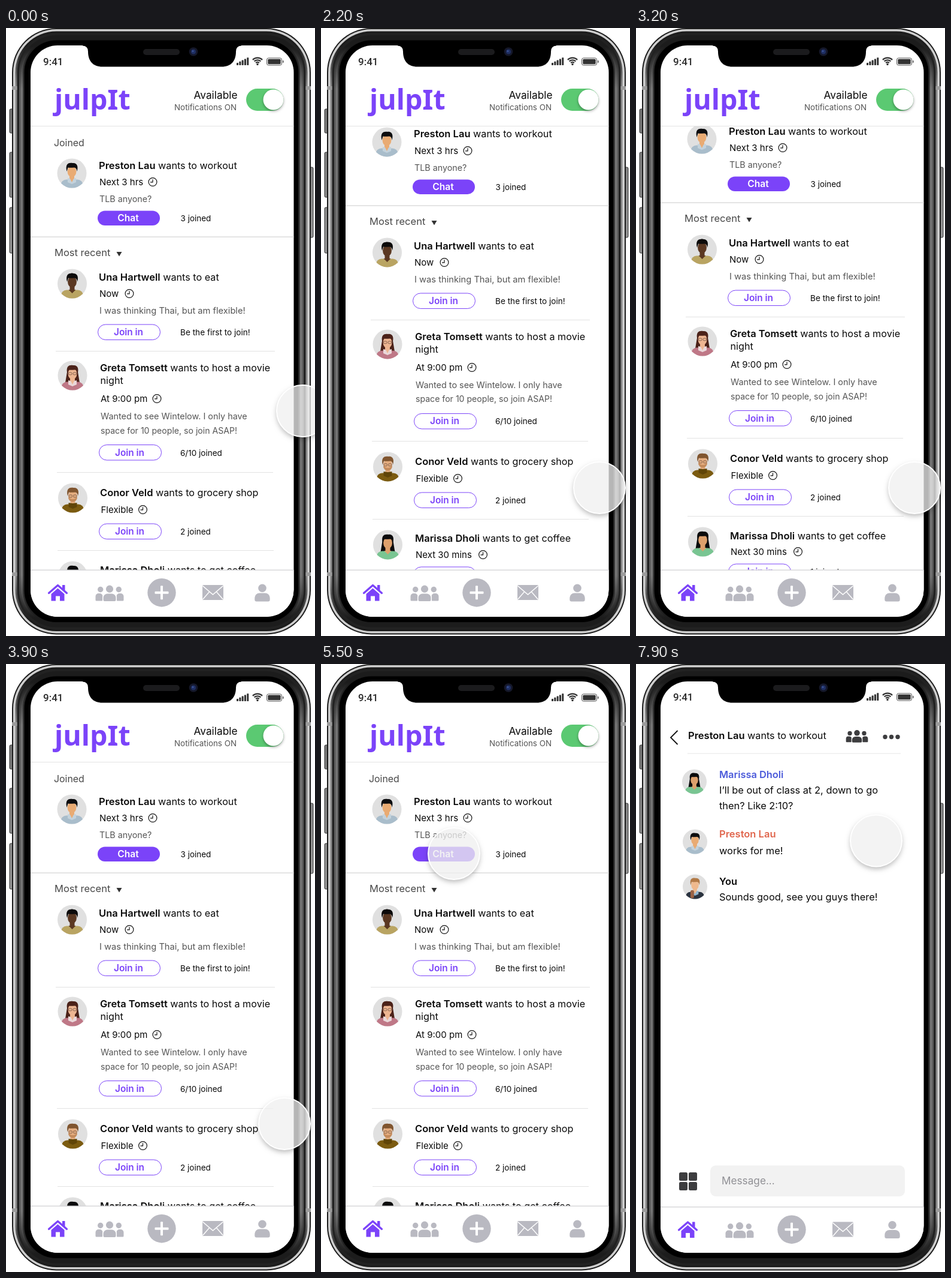
These frames come from a looping animation (516x1013 px, 8000 ms). An HTML page with a canvas:

```html
<!DOCTYPE html>
<html lang="en">
<head>
<meta charset="utf-8">
<title>Activity feed</title>
<style>
html, body { margin: 0; width: 100%; height: 100%; overflow: hidden; background: #fff; }
canvas { display: block; width: 516px; height: 1013px; }
</style>
</head>
<body>
<canvas id="stage"></canvas>
<script>
const W = 516, H = 1013, LOOP = 8000, TAU = Math.PI * 2;
const PURPLE = '#7b43f9', INK = '#0a0a0a', SOFT = '#555', GREY = '#b9b9c1', DARK = '#3d3d3f';
const canvas = document.getElementById('stage');
const ctx = canvas.getContext('2d');
const dpr = window.devicePixelRatio || 1;
canvas.width = W * dpr;
canvas.height = H * dpr;

// drawing helpers
function box(x, y, w, h, r, fill, stroke, line = 1) {
  ctx.beginPath();
  ctx.roundRect(x, y, w, h, r);
  paint(fill, stroke, line);
}
function disc(x, y, r, fill, stroke, line = 1) {
  ctx.beginPath();
  ctx.arc(x, y, r, 0, TAU);
  paint(fill, stroke, line);
}
function oval(x, y, rx, ry, fill) {
  ctx.beginPath();
  ctx.ellipse(x, y, rx, ry, 0, 0, TAU);
  paint(fill);
}
function poly(points, fill, stroke, line = 1) {
  ctx.beginPath();
  points.forEach(([x, y]) => ctx.lineTo(x, y));
  if (fill) ctx.closePath();
  paint(fill, stroke, line);
}
function paint(fill, stroke, line) {
  if (fill) { ctx.fillStyle = fill; ctx.fill(); }
  if (stroke) { ctx.strokeStyle = stroke; ctx.lineWidth = line; ctx.stroke(); }
}
function text(str, x, y, size, color = INK, weight = 400, align = 'left', family = 'Inter') {
  ctx.font = `${weight} ${size}px ${family}, sans-serif`;
  ctx.fillStyle = color;
  ctx.textAlign = align;
  ctx.fillText(str, x, y);
  return ctx.measureText(str).width;
}
function rule(x1, x2, y, color = '#e2e2e2', h = 1) {
  ctx.fillStyle = color;
  ctx.fillRect(x1, y, x2 - x1, h);
}
function at(x, y, scale, draw) {
  ctx.save();
  ctx.translate(x, y);
  ctx.scale(scale, scale);
  draw();
  ctx.restore();
}

// people
const PEOPLE = {
  preston: { name: 'Preston Lau', skin: '#e9ab73', hair: '#0d0d0f', top: '#a9bdcb', collar: '#c3d2dc' },
  una: { name: 'Una Hartwell', skin: '#5a3721', hair: '#0c0a0a', top: '#b9a462', bun: true },
  greta: { name: 'Greta Tomsett', skin: '#edb591', hair: '#4b2219', top: '#bf7887', collar: '#ead8da', long: true, glasses: true },
  conor: { name: 'Conor Veld', skin: '#e5ad7f', hair: '#80552f', top: '#7b5b10', collar: '#604508', beard: '#c48b5c', glasses: true },
  marissa: { name: 'Marissa Dholi', skin: '#dda06c', hair: '#0b0b0c', top: '#79c592', long: true },
  you: { name: 'You', skin: '#efb98d', hair: '#b27a47', top: '#2b333f', collar: '#8fb5cf', scarf: true }
};

function avatar(p, x, y, r) {
  at(x, y, r / 24.5, () => {
    disc(0, 0, 24.5, '#e0e0e0');
    ctx.beginPath();
    ctx.arc(0, 0, 24.5, 0, TAU);
    ctx.clip();
    if (p.long) poly([[-8, -12], [8, -12], [10, 0], [12, 12], [-12, 12], [-10, 0]], p.hair);
    if (p.bun) oval(0, -14, 5, 3.5, p.hair);
    box(-18.5, 10.5, 37, 20, [9, 9, 0, 0], p.top);
    box(-4, 2, 8, 10, 3, p.skin);
    poly([[-6, 10], [6, 10], [0, 16]], p.skin);
    if (p.collar) {
      const s = p.beard ? 0 : 3;
      poly([[-7, 8], [-s, 9], [0, 15], [s, 9], [7, 8], [7, 15], [0, 18], [-7, 15]], p.collar);
    }
    if (p.scarf) box(-9, 7, 7, 16, 3, '#9a6244');
    oval(0, -3, 7.4, 9.5, p.skin);
    if (p.beard) {
      ctx.beginPath();
      ctx.ellipse(0, -1, 7.4, 7.5, 0, 0, Math.PI);
      paint(p.beard);
      oval(0, -1, 5.5, 3, p.skin);
    }
    ctx.beginPath();
    ctx.moveTo(-8.5, -3);
    ctx.bezierCurveTo(-12, -17, -4, -18, 1, -17);
    ctx.bezierCurveTo(9, -18, 11, -11, 8.5, -3);
    ctx.quadraticCurveTo(8, -9, 4, -9.5);
    ctx.quadraticCurveTo(-4, -9, -6.5, -9.5);
    ctx.closePath();
    paint(p.hair);
    if (p.glasses) {
      box(-6.5, -5, 5.5, 3.8, 1.5, null, '#5a4034', 0.7);
      box(1, -5, 5.5, 3.8, 1.5, null, '#5a4034', 0.7);
    }
  });
}

// icons
function clock(x, y) {
  disc(x, y, 6.9, null, '#111', 1.2);
  poly([[x, y - 4.2], [x, y + 0.4], [x - 4, y + 0.4]], null, '#111', 1.2);
}
function group(x, y, scale, color) {
  at(x, y, scale, () => {
    for (const s of [-1, 1]) {
      disc(s * 15.3, -6.5, 4.7, color);
      box(s * 17.5 - 6, 0, 12, 12.5, [5, 5, 1.5, 1.5], color);
    }
    box(-12, -1, 24, 15, [8, 8, 3, 3], '#fff');
    disc(0, -7.3, 7.6, '#fff');
    disc(0, -7.3, 6.1, color);
    box(-10.5, 0.5, 21, 12.5, [7, 7, 2, 2], color);
  });
}
function home(x, y) {
  at(x, y, 1, () => {
    ctx.lineCap = 'round';
    ctx.lineJoin = 'round';
    box(7.5, -12, 4.5, 9, 0.5, PURPLE);
    poly([[-15, 1.5], [0, -11.5], [15, 1.5]], null, PURPLE, 3.2);
    poly([[-11, 3], [0, -6.5], [11, 3], [11, 14.5], [3.5, 14.5], [3.5, 6.5], [-3.5, 6.5], [-3.5, 14.5], [-11, 14.5]], PURPLE);
  });
}
function mail(x, y) {
  box(x - 17.5, y - 12.5, 35, 25, 1.5, GREY);
  poly([[x - 17, y - 11], [x, y + 3.5], [x + 17, y - 11]], null, '#fff', 1.6);
  poly([[x - 17, y + 11.5], [x - 6, y - 1]], null, '#fff', 1.4);
  poly([[x + 17, y + 11.5], [x + 6, y - 1]], null, '#fff', 1.4);
}
function nav(dy) {
  ctx.fillStyle = '#fff';
  ctx.fillRect(41, 903 + dy, 440, 80);
  rule(41, 481, 902.5 + dy, '#d3d3d5', 1.3);
  home(86.5, 940 + dy);
  group(173, 942 + dy, 1, GREY);
  disc(260, 940.7 + dy, 23.7, GREY);
  box(248.5, 938.7 + dy, 23, 4, 1, '#fff');
  box(258, 929.2 + dy, 4, 23, 1, '#fff');
  mail(345.5, 940.5 + dy);
  disc(428, 933.3 + dy, 6.8, GREY);
  box(415.3, 941.5 + dy, 25.4, 14, [8, 8, 3, 3], GREY);
}

// feed
function heading(p, rest, x, y) {
  const w = text(p.name, x, y, 16.5, INK, 600);
  text(' ' + rest, x + w, y, 16.2);
}
function joinPill(x, y) {
  box(x, y, 104, 25.5, 12.75, '#fff', PURPLE);
  text('Join in', x + 51, y + 18, 15.4, PURPLE, 600, 'center');
}
function entry(p, o) {
  avatar(p, o.ax, o.ay, 24.5);
  heading(p, o.title, o.x, o.y);
  text(o.when, o.wx, o.wy, 15);
  clock(o.cx, o.wy - 5.5);
}

function feed(scroll) {
  ctx.save();
  ctx.beginPath();
  ctx.rect(41, 163, 440, 740);
  ctx.clip();
  ctx.translate(0, -scroll);

  text('Joined', 80, 197, 15.9, '#484848');
  entry(PEOPLE.preston, { ax: 110, ay: 242, x: 155, y: 234.5, title: 'wants to workout', when: 'Next 3 hrs', wx: 156, wy: 262, cx: 245 });
  text('TLB anyone?', 156, 290, 14.3, SOFT);
  box(153, 304.5, 104, 24.5, 12.25, PURPLE);
  text('Chat', 204, 322, 15.6, '#fff', 600, 'center');
  text('3 joined', 291.5, 322, 13.5);
  rule(41, 481, 347.3, '#dcdcdc', 1.5);

  text('Most recent', 81, 380, 16.5, '#484848');
  poly([[184.5, 373], [193.5, 373], [189, 380.5]], '#333');

  entry(PEOPLE.una, { ax: 110.5, ay: 426, x: 155, y: 421, title: 'wants to eat', when: 'Now', wx: 156, wy: 448, cx: 206 });
  text('I was thinking Thai, but am flexible!', 156, 476, 14.7, SOFT);
  joinPill(153.5, 494);
  text('Be the first to join!', 291, 512, 13.6);
  rule(83, 449, 538);

  entry(PEOPLE.greta, { ax: 111, ay: 579, x: 157, y: 572, title: 'wants to host a movie', when: 'At 9:00 pm', wx: 158, wy: 623, cx: 252 });
  text('night', 157.5, 593, 16.2);
  text('Wanted to see Wintelow. I only have', 158, 652, 14.4, SOFT);
  text('space for 10 people, so join ASAP!', 158, 675.5, 14.1, SOFT);
  joinPill(155.5, 694.5);
  text('6/10 joined', 291, 712.5, 13.5);
  rule(85, 446, 740);

  entry(PEOPLE.conor, { ax: 111.5, ay: 783, x: 157, y: 780, title: 'wants to grocery shop', when: 'Flexible', wx: 158.5, wy: 808, cx: 228.5 });
  joinPill(155.5, 826);
  text('2 joined', 291, 844, 13.5);
  rule(86, 447, 870);

  entry(PEOPLE.marissa, { ax: 111.5, ay: 913, x: 157, y: 908.5, title: 'wants to get coffee', when: 'Next 30 mins', wx: 158, wy: 935, cx: 270.5 });
  joinPill(154.5, 950);
  text('1 joined', 291, 968, 13.5);
  ctx.restore();

  // header
  text('julpIt', 81, 135.5, 46.5, PURPLE, 700, 'left', '"Noto Sans"');
  text('Available', 386.5, 118, 17.3, INK, 400, 'right');
  text('Notifications ON', 385, 136.5, 13.4, SOFT, 400, 'right');
  box(401, 101, 62.5, 37, 18.5, '#5bc972');
  ctx.save();
  ctx.shadowColor = 'rgba(0,0,0,.35)';
  ctx.shadowBlur = 4 * dpr;
  ctx.shadowOffsetY = 2 * dpr;
  disc(446.5, 119.5, 17, '#fff');
  ctx.restore();
  rule(41, 481, 163, '#e3e3e3');
  nav(0);
}

// conversation
function chat() {
  poly([[69.5, 111], [58, 122.5], [69.5, 134]], null, '#111', 1.8);
  heading(PEOPLE.preston, 'wants to workout', 87, 125);
  group(369, 120.5, 0.78, DARK);
  for (const x of [416, 426.5, 437]) disc(x, 121.5, 3.7, DARK);
  rule(86, 442, 148.5, '#ececec', 1.3);

  avatar(PEOPLE.marissa, 97.5, 196, 20.5);
  text(PEOPLE.marissa.name, 139, 189.5, 16.4, '#4b5ada', 600);
  text('I’ll be out of class at 2, down to go', 139, 215.5, 16.4);
  text('then? Like 2:10?', 139, 242, 16.4);

  avatar(PEOPLE.preston, 98.5, 296, 20.5);
  text(PEOPLE.preston.name, 139, 289, 16.5, '#e0654c', 600);
  text('works for me!', 139, 317, 16.4);

  avatar(PEOPLE.you, 98.5, 371, 20.5);
  text(PEOPLE.you.name, 139, 367.5, 16.4, INK, 600);
  text('Sounds good, see you guys there!', 139, 393.5, 16.4);

  for (const x of [72, 88]) for (const y of [847, 863]) box(x, y, 14, 14, 2.5, DARK);
  box(124, 835.5, 325, 51.5, 9, '#f2f2f2');
  text('Message...', 143, 867, 17.2, '#909095');
  nav(1.5);
}

// device
function metal(tone) {
  const g = ctx.createLinearGradient(0, 0, 0, H);
  g.addColorStop(0, '#1c1c1c');
  g.addColorStop(0.03, '#1c1c1c');
  g.addColorStop(0.1, tone);
  g.addColorStop(0.9, tone);
  g.addColorStop(0.97, '#1c1c1c');
  g.addColorStop(1, '#1c1c1c');
  return g;
}
function body() {
  const edge = ctx.createLinearGradient(0, 130, 0, 380);
  edge.addColorStop(0, '#777');
  edge.addColorStop(1, '#999');
  for (const [y, h] of [[135, 40], [207, 75], [299, 76]]) box(6, y, 8, h, 2, edge, '#333');
  box(505, 232, 8, 117, 2, edge, '#333');

  const layers = [[0, '#1c1c1c'], [2, '#cfcfcf'], [5.5, metal('#8a8a8a')], [8.5, '#222'], [12, metal('#5f5f5f')], [15, metal('#777')], [18, metal('#3a3a3a')], [20.5, '#000']];
  for (const [d, fill] of layers) box(10 + d, d, 499 - 2 * d, 1010.5 - 2 * d, 74 - d, fill);
  for (const x of [10, 500.5]) for (const y of [97, 907]) box(x, y, 8.5, 6, 0, '#9c9c9c');
}
function notch() {
  ctx.beginPath();
  ctx.moveTo(128, 28);
  ctx.lineTo(393, 28);
  ctx.lineTo(393, 29.5);
  ctx.quadraticCurveTo(384, 30, 384, 39);
  ctx.bezierCurveTo(384, 55, 376, 64.5, 360, 64.5);
  ctx.lineTo(161, 64.5);
  ctx.bezierCurveTo(145, 64.5, 137, 55, 137, 39);
  ctx.quadraticCurveTo(137, 30, 128, 29.5);
  ctx.closePath();
  paint('#000');
  box(229, 35, 61, 10, 5, '#1b1b1d');
  disc(313, 39.5, 7.3, '#15182a');
  disc(313, 39.5, 4, '#1f2f63');
  disc(312, 38.5, 1.5, '#3d5595');
}
function status(dy) {
  at(0, dy, 1, () => {
    text('9:41', 62, 61.5, 17, '#2b2b2b', 500, 'left', 'Roboto');
    for (let i = 0; i < 5; i++) {
      const h = 4 + i * 2.2;
      box(385 + i * 4.3, 62 - h, 3.1, h, 0.8, '#333');
    }
    for (const r of [4, 7.7, 11.4]) {
      ctx.beginPath();
      ctx.arc(420, 61, r, -Math.PI * 0.75, -Math.PI * 0.25);
      paint(null, '#333', 2.3);
    }
    disc(420, 60.5, 1.7, '#333');
    box(435.5, 50, 25, 12, 3, null, '#555');
    box(437.3, 51.8, 21.4, 8.4, 1.5, '#333');
    box(462, 54, 1.6, 4, 0.8, '#555');
  });
}

function cursor(x, y) {
  const r = 43;
  ctx.save();
  ctx.beginPath();
  ctx.rect(0, 0, W, H);
  ctx.arc(x, y, r, 0, TAU);
  ctx.clip('evenodd');
  ctx.shadowColor = 'rgba(0,0,0,.28)';
  ctx.shadowBlur = 8 * dpr;
  ctx.shadowOffsetY = 4 * dpr;
  disc(x, y, r, '#fff');
  ctx.restore();
  disc(x, y, r, 'rgba(240,240,240,.76)', '#fff', 2);
}

// motion
const clamp = v => Math.min(1, Math.max(0, v));
const span = (t, a, b) => clamp((t - a) / (b - a));
const easeOut = p => 1 - (1 - p) ** 3;
const easeInOut = p => p < 0.5 ? 2 * p * p : 1 - 2 * (1 - p) ** 2;

const MOVES = [
  { from: 1000, to: 1700, x: 465, y: 766 },
  { from: 4250, to: 5350, x: 222, y: 316 },
  { from: 6400, to: 7100, x: 401, y: 294.5 }
];
function pointer(t) {
  let x = 495, y = 638;
  for (const m of MOVES) {
    const p = easeInOut(span(t, m.from, m.to));
    x += (m.x - x) * p;
    y += (m.y - y) * p;
  }
  return [x, y];
}
function scrollAt(t) {
  return 57 * (easeOut(span(t, 1850, 2480)) - easeInOut(span(t, 3250, 3620)));
}

function draw(t) {
  const chatting = t >= 5900;
  ctx.setTransform(dpr, 0, 0, dpr, 0, 0);
  ctx.fillStyle = '#fff';
  ctx.fillRect(0, 0, W, H);
  body();
  ctx.save();
  ctx.beginPath();
  ctx.roundRect(41, 29, 439.5, 952, 45);
  ctx.clip();
  ctx.fillStyle = '#fff';
  ctx.fillRect(41, 29, 440, 952);
  if (chatting) chat();
  else feed(scrollAt(t));
  ctx.restore();
  notch();
  status(chatting ? -1 : 0);
  cursor(...pointer(t));
}

const start = performance.now();
function tick() {
  draw((performance.now() - start) % LOOP);
  requestAnimationFrame(tick);
}
tick();
</script>
</body>
</html>
```
